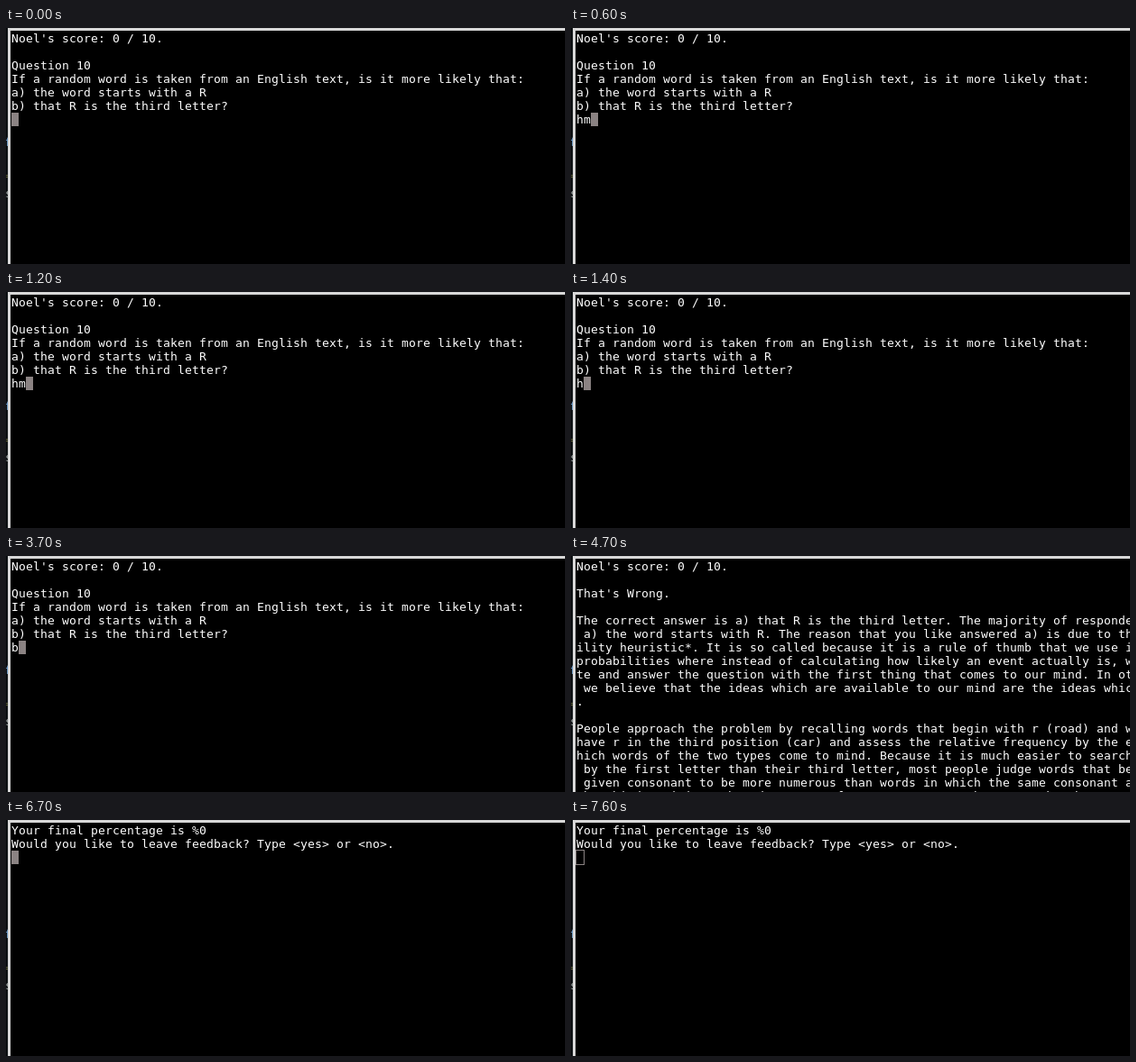
Write an HTML page that moves like this. It is 619 by 262 pixels and loops after 7.9 s.

```html
<!DOCTYPE html>
<html lang="en">
<meta charset="utf-8">
<title>Terminal quiz</title>
<style>
  html, body { margin: 0; width: 100%; height: 100%; overflow: hidden; background: #0c1012; }
  body, pre { font: 13px/15px "DejaVu Sans Mono", monospace; }
  #behind, #window { position: absolute; overflow: hidden; }
  #behind { left: 0; top: 0; width: 2px; height: 262px; }
  #behind span { position: absolute; }
  #window { left: 2px; top: 0; width: 617px; height: 262px; box-sizing: border-box;
            background: #000; border: solid #d8d8d8; border-width: 3px 0 0 3px; }
  pre { position: absolute; left: 1px; top: 1px; margin: 0; color: #fff;
        letter-spacing: calc(8px - 1ch); font-variant-ligatures: none; }
  #cursor { position: absolute; width: 8px; height: 15px; background: #8b8383; }
  #cursor.hollow { background: none; outline: 1px solid #8b8383; }
</style>
<div id="behind">
  <span style="left:-2px; top:119px; color:#6f9fd0">f</span>
  <span style="left:-3px; top:156px; color:#5c5c34">=</span>
  <span style="left:-1px; top:176px; color:#a4aaa8">s</span>
</div>
<div id="window"><pre><span id="text"></span><i id="cursor"></i></pre></div>
<script>
const score = "Noel's score: 0 / 10.\n\n";

const question = score + `Question 10
If a random word is taken from an English text, is it more likely that:
a) the word starts with a R
b) that R is the third letter?
`;

const answer = score + `That's Wrong.

The correct answer is a) that R is the third letter. The majority of responde
 a) the word starts with R. The reason that you like answered a) is due to th
ility heuristic*. It is so called because it is a rule of thumb that we use i
probabilities where instead of calculating how likely an event actually is, w
te and answer the question with the first thing that comes to our mind. In ot
 we believe that the ideas which are available to our mind are the ideas whic
.

People approach the problem by recalling words that begin with r (road) and w
have r in the third position (car) and assess the relative frequency by the e
hich words of the two types come to mind. Because it is much easier to search
 by the first letter than their third letter, most people judge words that be
 given consonant to be more numerous than words in which the same consonant a
the third position. They do so even for consonants, such as r or k, that are
`;

const feedback = `Your final percentage is %0
Would you like to leave feedback? Type <yes> or <no>.
`;

const LOOP = 7900;
// [start in ms, screen content, hollow cursor]
const steps = [
  [0, question],
  [500, question + "h"],
  [600, question + "hm"],
  [800, question + "hmm"],
  [1200, question + "hm"],
  [1400, question + "h"],
  [1500, question],
  [3700, question + "b"],
  [4700, answer],
  [6700, feedback],
  [7600, feedback, true],
];

const text = document.getElementById("text");
const cursor = document.getElementById("cursor");
let shown;

function show(step) {
  const [, content, hollow = false] = step;
  const lines = content.split("\n");
  text.textContent = content;
  cursor.style.left = lines.at(-1).length * 8 + "px";
  cursor.style.top = (lines.length - 1) * 15 + "px";
  cursor.classList.toggle("hollow", hollow);
  shown = step;
}

function tick() {
  const time = performance.now() % LOOP;
  const step = steps.findLast(([start]) => start <= time);
  if (step !== shown) show(step);
  requestAnimationFrame(tick);
}
tick();
</script>
</html>
```
